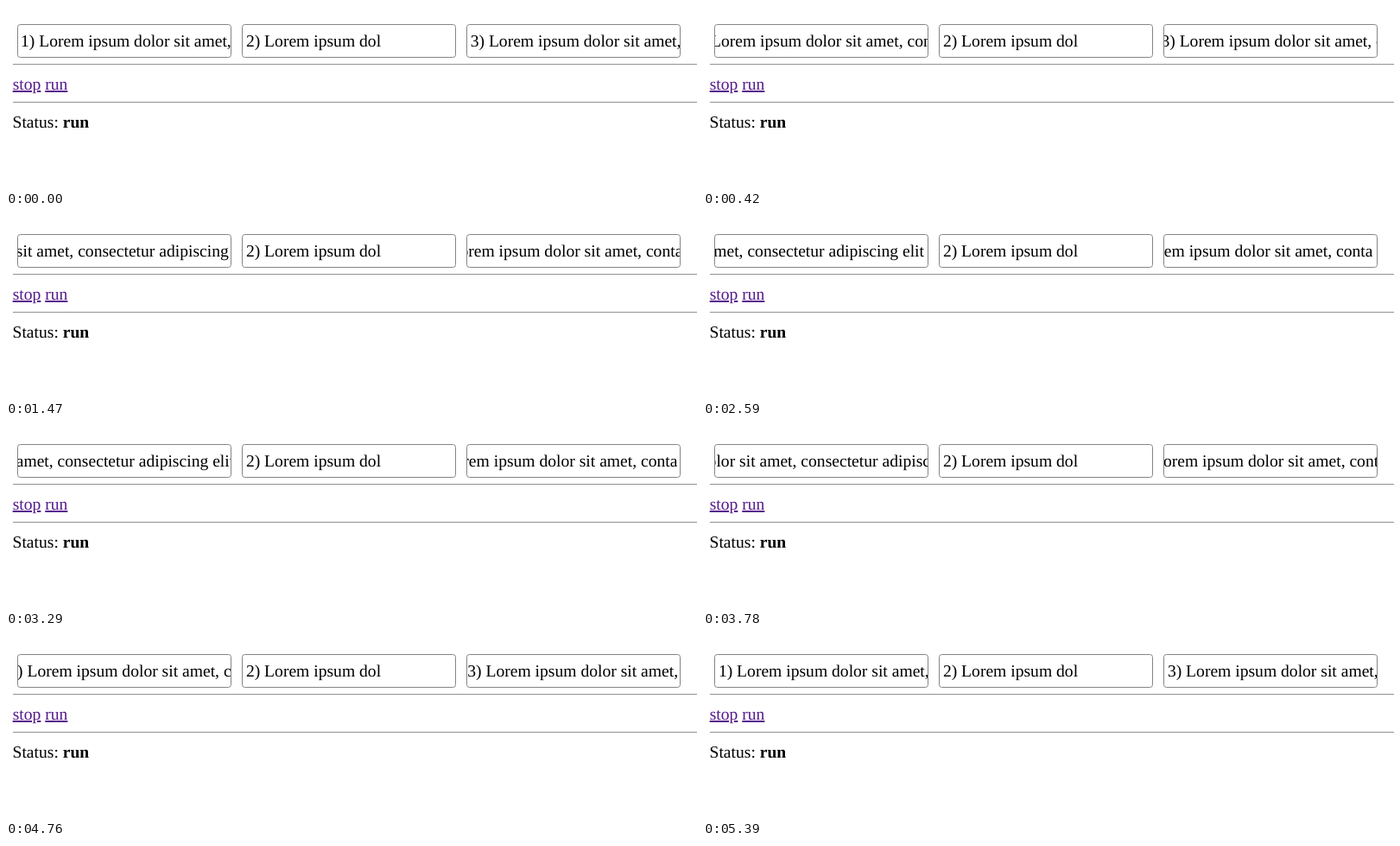
Recreate the animation shown at these times as an HTML page. Size 800 by 211 pixels, loop 5.95 s.

```html
<!DOCTYPE html>
<html lang="en">
<head>
<meta charset="utf-8">
<title>Scrolling inputs</title>
<style>
  html, body { margin: 0; width: 100%; height: 100%; overflow: hidden; background: #fff; }
  svg { display: block; overflow: hidden; }
  text { font: 19.6px "Liberation Serif", Times, serif; text-rendering: geometricPrecision; white-space: pre; }
  .box { fill: #fff; stroke: #858585; }
  .link { fill: #551a8b; text-decoration: underline; }
  .bold { font-weight: bold; }
</style>
</head>
<body>
<svg id="stage" width="800" height="211" viewBox="0 0 800 211">
  <path d="M8 67.5H800M8 111.5H800" stroke="#999"/>
  <path d="M8 68.5H800M8 112.5H800" stroke="#eee"/>
  <text x="7.7" y="97"><tspan class="link">stop</tspan> <tspan class="link">run</tspan></text>
  <text x="7.5" y="141">Status: <tspan class="bold">run</tspan></text>
</svg>
<script>
const LOOP = 5950, STEP = 70, DURATION = 2080;
const FORWARD = -88, BACK = 3030;
const stage = document.getElementById('stage');

function add(parent, tag, attrs) {
  const el = document.createElementNS('http://www.w3.org/2000/svg', tag);
  for (const name in attrs) el.setAttribute(name, attrs[name]);
  return parent.appendChild(el);
}

// Each input clips its text; range is how far the text can scroll.
const inputs = [
  [13, '1) Lorem ipsum dolor sit amet, consectetur adipiscing elit', 215.2],
  [273, '2) Lorem ipsum dol', 0],
  [533, '3) Lorem ipsum dolor sit amet, conta', 53.6]
].map(([x, value, range]) => {
  add(stage, 'rect', { class: 'box', x: x + 0.5, y: 21.5, width: 247, height: 38, rx: 3 });
  const view = add(stage, 'svg', { x: x + 1, y: 22, width: 246, height: 37 });
  const text = add(view, 'text', { y: 25 });
  text.textContent = value;
  return { text, range };
});

function swing(time) {
  const x = Math.min(1, Math.max(0, time / DURATION));
  return 0.5 - Math.cos(Math.PI * x) / 2;
}

function draw(now) {
  const t = Math.floor(now % LOOP / STEP) * STEP;
  // The forward scroll begins just before the loop wraps.
  const progress = swing(t - FORWARD) - swing(t - BACK) + swing(t - FORWARD - LOOP);
  for (const { text, range } of inputs) text.setAttribute('x', 3.9 - range * progress);
}

const start = performance.now();
function tick() {
  draw(performance.now() - start);
  requestAnimationFrame(tick);
}
tick();
</script>
</body>
</html>
```
